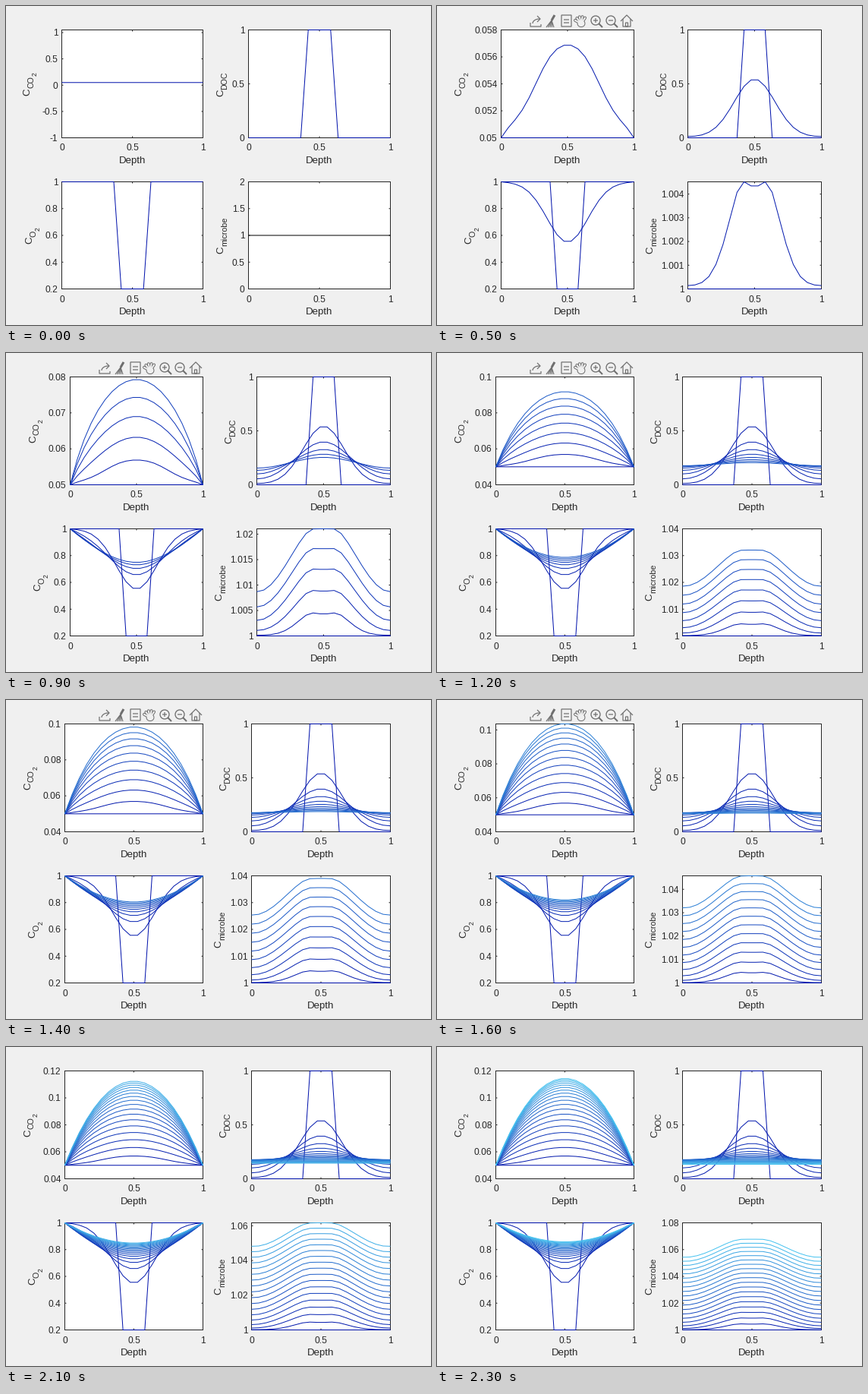
Animation, 560 px wide and 420 px high, one loop 2400 ms. Source, as a matplotlib script:

```python
import math

import matplotlib.pyplot as plt
import numpy as np
from matplotlib.animation import FuncAnimation
from matplotlib.patches import Circle, Rectangle

W, H, DPI = 560, 420, 80
FRAMES, INTERVAL = 24, 100
STEPS, SUBSTEPS = 19, 50
BACK, INK, ICON = "#f0f0f0", "#262626", "#6e6e6e"
FIRST_COLOR = np.array([0.0, 0.065, 0.67])
LAST_COLOR = np.array([0.28, 0.765, 0.94])
LABELS = (("C", "CO", "2"), ("C", "DOC"), ("C", "O", "2"), ("C", "microbe"))

plt.rcParams["font.family"] = "Liberation Sans"
plt.rcParams["path.snap"] = False
fig = plt.figure(figsize=(W / DPI, H / DPI), dpi=DPI, facecolor=BACK)
ax = fig.add_axes([0, 0, 1, 1])
grid = np.linspace(0, 1, 20)


def px(size):
    """Pixels to points."""
    return size * 72 / DPI


# ---- model: diffusion with microbial uptake -------------------------------

def diffusion(c):
    padded = np.pad(c, 1, mode="reflect")
    return (padded[2:] - 2 * c + padded[:-2]) / (grid[1] - grid[0]) ** 2


def simulate():
    core = np.abs(grid - 0.5) < 0.1
    co2 = np.full(grid.size, 0.05)
    doc = np.where(core, 1.0, 0.0)
    o2 = np.where(core, 0.2, 1.0)
    microbe = np.ones(grid.size)
    states = [(co2, doc, o2, microbe)]
    dt = 1 / SUBSTEPS
    for k in range(1, STEPS * SUBSTEPS + 1):
        growth = 0.0085 * microbe * doc / (0.2 + doc) * o2 / (0.2 + o2)
        release = 0.007 * math.exp(-k * dt / 4)
        co2 = co2 + dt * (0.0088 * diffusion(co2) + 1.45 * growth + 0.0009)
        doc = doc + dt * (0.0102 * diffusion(doc) - 1.7 * growth + release)
        o2 = o2 + dt * (0.01 * diffusion(o2) - 2.65 * growth)
        microbe = microbe + dt * growth
        co2[[0, -1]] = 0.05
        o2[[0, -1]] = 1.0
        if k % SUBSTEPS == 0:
            states.append((co2, doc, o2, microbe))
    return np.array(states)


states = simulate()


# ---- axis limits and ticks ------------------------------------------------

def nice_steps():
    for exponent in range(-4, 2):
        for base in (1, 2, 5):
            yield base * 10.0 ** exponent


def auto_limits(values, slack):
    """Round limits outward unless that wastes more than slack of the span."""
    lo, hi = values.min(), values.max()
    span = hi - lo
    if span < 1e-9:
        return math.floor(lo - 1), hi + 1
    for step in nice_steps():
        low = math.floor(lo / step + 1e-6) * step
        high = math.ceil(hi / step - 1e-6) * step
        if round((high - low) / step) <= 4:
            break
    return (low if lo - low <= slack * span else lo,
            high if high - hi <= slack * span else hi)


def auto_ticks(lo, hi):
    step = next(s for s in nice_steps() if (hi - lo) / s < 4.9)
    first = math.ceil(lo / step - 1e-6)
    last = math.floor(hi / step + 1e-6)
    return [round(i * step, 6) for i in range(first, last + 1)]


def widest_label(ticks):
    """Width in pixels of the longest tick label."""
    return max(sum(6.67 if c.isdigit() else 3.33 for c in f"{v:g}")
               for v in ticks)


# ---- panels ---------------------------------------------------------------

def line(xs, ys, color=INK, width=1.0, cap="butt"):
    ax.plot(xs, ys, color=color, lw=px(width), solid_capstyle=cap)


def text(x, y, s, size=12, **kw):
    return ax.text(x, y, s, fontsize=px(size), color=INK, va="baseline", **kw)


def side_label(x, mid, parts):
    """Rotated label; each further part is a deeper subscript."""
    renderer = fig.canvas.get_renderer()
    pieces = [text(x + 4.7 * depth, mid, s, 13.2 * 0.81 ** depth, rotation=90,
                   rotation_mode="anchor", ha="left")
              for depth, s in enumerate(parts)]
    lengths = [p.get_window_extent(renderer).height for p in pieces]
    y = mid + sum(lengths) / 2
    for piece, length in zip(pieces, lengths):
        piece.set_y(y)
        y -= length


def draw_panel(index, shown, left, limits, ticks):
    row, col = divmod(index, 2)
    left, right = left + 246 * col, 259.5 + 247 * col
    top, bottom = 31.5 + 200 * row, 173.5 + 199 * row
    lo, hi = limits

    def to_y(v):
        return bottom - (v - lo) / (hi - lo) * (bottom - top)

    ax.add_patch(Rectangle((left, top), right - left, bottom - top,
                           fc="white", ec=INK, lw=px(1)))
    for v in (0, 0.5, 1):
        x = left + v * (right - left)
        line([x, x], [bottom, bottom - 2])
        line([x, x], [top, top + 2])
        text(x, bottom + 17, f"{v:g}", ha="center")
    for v in ticks:
        y = to_y(v)
        line([left, left + 2], [y, y])
        line([right, right - 2], [y, y])
        text(left - 5, y + 4.3, f"{v:g}", ha="right")
    text((left + right) / 2, bottom + 33.5, "Depth", 13.2, ha="center")

    parts = LABELS[index]
    side_label(left - 5 - widest_label(ticks) - 5.7 * len(parts),
               (top + bottom) / 2, parts)

    untouched_microbes = index == 3 and len(shown) == 1
    for i, values in enumerate(shown):
        color = FIRST_COLOR + (LAST_COLOR - FIRST_COLOR) * i / STEPS
        line(left + grid * (right - left), to_y(values),
             "black" if untouched_microbes else color)


# ---- toolbar --------------------------------------------------------------

def draw_toolbar(x, y=20):
    """Seven tool icons, 20 pixels apart; x is the centre of the first."""

    def stroke(slot, points, width=1.2, color=ICON, cap="butt"):
        xs, ys = np.transpose(points)
        line(x + 20 * slot + xs, y + ys, color, width, cap)

    def box(slot, left, top, width, height):
        ax.add_patch(Rectangle((x + 20 * slot + left, y + top), width, height,
                               fill=False, ec=ICON, lw=px(1.2)))

    # export: curved arrow over a tray
    bend = np.linspace(0, math.pi / 2, 9)
    stroke(0, np.column_stack([5 - 9 * np.cos(bend), 3 - 6 * np.sin(bend)]))
    stroke(0, [(2, -7), (6, -3), (2, 1)])
    stroke(0, [(-7, 2), (-7, 7), (7, 7), (7, 4)])
    # brush: handle and fanned bristles
    stroke(1, [(5, -8), (1, -1)], 3)
    for tip in np.linspace(-6, 4, 5):
        stroke(1, [(1, -1), (tip, 8)])
    # data tip: note with lines
    box(2, -6, -8, 13, 15)
    for row in (-2, 2):
        stroke(2, [(-3, row), (4, row)])
    # hand: outlined palm with fanned fingers
    for inset, color in ((0, ICON), (2, BACK)):
        stroke(3, [(-0.5, 3), (0.5, 3)], 10 - inset, color, "round")
        for angle in np.linspace(-1.1, 0.6, 5):
            tip = (9 * math.sin(angle), 3 - 9 * math.cos(angle))
            stroke(3, [(0, 3), tip], 4 - inset, color, "round")
    # zoom in and zoom out
    for slot in (4, 5):
        ax.add_patch(Circle((x + 20 * slot - 1, y - 1), 6, fill=False,
                            ec=ICON, lw=px(1.3)))
        stroke(slot, [(3, 3), (8, 8)], 2)
        stroke(slot, [(-4, -1), (2, -1)])
    stroke(4, [(-1, -4), (-1, 2)])
    # home: roof, walls and door
    stroke(6, [(-8, 0), (0, -8), (8, 0)])
    stroke(6, [(-5, -3), (-5, 7), (5, 7), (5, -3)])
    box(6, -1.5, 2, 3, 5)


def draw(frame):
    ax.clear()
    ax.set(xlim=(0, W), ylim=(H, 0))
    ax.axis("off")
    shown = states[:max(1, frame - 3)]

    limits = [auto_limits(shown[:, i], 0.28 if i == 3 else 0.25)
              for i in range(4)]
    ticks = [auto_ticks(*pair) for pair in limits]
    left = math.floor(52.6 + 1.05 * max(map(widest_label, ticks))) + 0.5
    for i in range(4):
        draw_panel(i, shown[:, i], left, limits[i], ticks[i])

    if 5 <= frame < 20:
        draw_toolbar(130 if frame < 17 else 377)
    return ()


anim = FuncAnimation(fig, draw, frames=FRAMES, interval=INTERVAL,
                     repeat=True, repeat_delay=0, blit=False)
plt.show()
```
